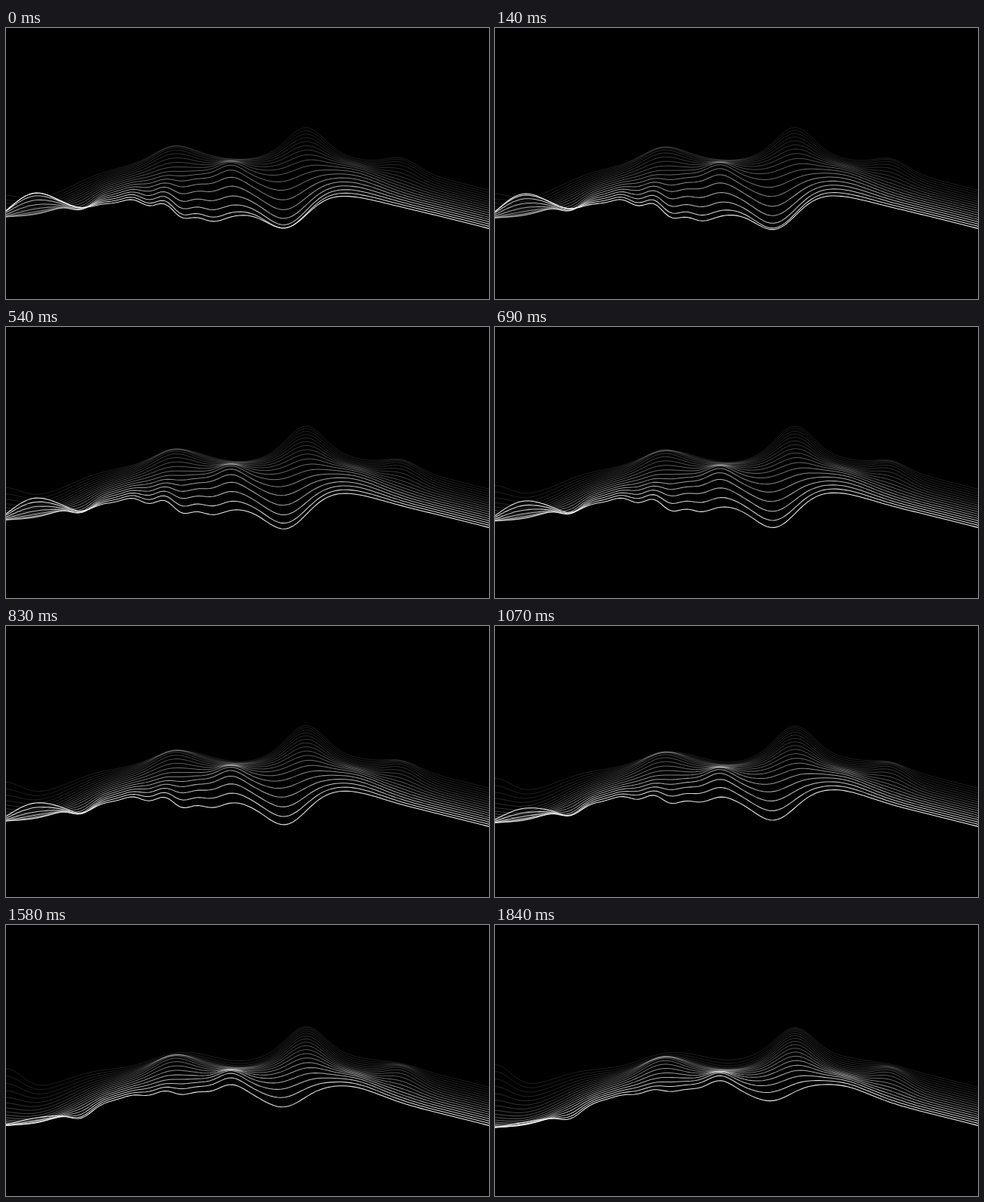
An HTML page for the animation above (1880 ms loop, 640 by 360 pixels).

```html
<!DOCTYPE html>
<html lang="en">
<head>
<meta charset="utf-8">
<title>Wave lines</title>
<style>
  html, body { margin: 0; width: 100%; height: 100%; overflow: hidden; background: #000; }
  svg { display: block; width: 100vw; height: 100vh; }
  path { fill: none; stroke: #fff; }
</style>
</head>
<body>
<svg id="stage" viewBox="0 0 640 360"></svg>
<script>
const LOOP = 1880;
const WIDTH = 640;
const STEP = 5;
const LINES = 18;
const GAP = 3;             // vertical distance between the base lines
const SPEED = 6 / 1840;    // terrain depth scrolled per ms

const bell = (v, centre, spread) => Math.exp(-(((v - centre) / spread) ** 2));

// A smooth crest (negative height) or hollow (positive height) in the terrain.
const hill = (x0, z0, width, depth, height) =>
  (x, z) => height * bell(x, x0, width) * bell(z, z0, depth);

const hills = [
  // left
  hill(45, 14, 75, 11, 30),
  hill(35, 0, 45, 4.5, -38),
  hill(100, 5, 20, 4, 11),
  hill(0, 25, 30, 6, -38),
  // centre, near
  hill(272, 0, 70, 4.2, 42),
  hill(372, 1.5, 42, 5, 50),
  hill(298, 7, 24, 4, -13),
  // centre, far
  hill(222, 14, 35, 5, -18),
  hill(310, 21, 55, 6, 19),
  hill(165, 23, 50, 7, 12),
  hill(398, 19, 34, 11, -36),
  // right
  hill(460, 8, 50, 6, -14),
  hill(525, 16, 30, 5, -15)
];

const arch = x => 260 + x / 100 - 50 * Math.sin(Math.PI * x / WIDTH);

const ripple = (x, z) =>
  5 * Math.cos(2 * Math.PI * (x - 187) / 47) * bell(x, 215, 55) * bell(z, 1, 5);

const terrain = (x, z) =>
  hills.reduce((y, rise) => y + rise(x, z), arch(x) + ripple(x, z));

const stage = document.getElementById("stage");
const paths = [];
for (let i = LINES - 1; i >= 0; i--) {
  const path = document.createElementNS("http://www.w3.org/2000/svg", "path");
  const near = 1 - i / (LINES - 1);
  path.setAttribute("stroke-opacity", 0.13 + 0.8 * near ** 1.9);
  path.setAttribute("stroke-width", 0.9 + 0.15 * near);
  paths[i] = stage.appendChild(path);
}

function draw(t) {
  paths.forEach((path, i) => {
    const z = i + t * SPEED;
    const points = [];
    for (let x = 0; x <= WIDTH; x += STEP) {
      points.push(`${x} ${(terrain(x, z) - GAP * i).toFixed(2)}`);
    }
    path.setAttribute("d", "M" + points.join("L"));
  });
}

const start = performance.now();
function tick() {
  draw((performance.now() - start) % LOOP);
  requestAnimationFrame(tick);
}
tick();
</script>
</body>
</html>
```
